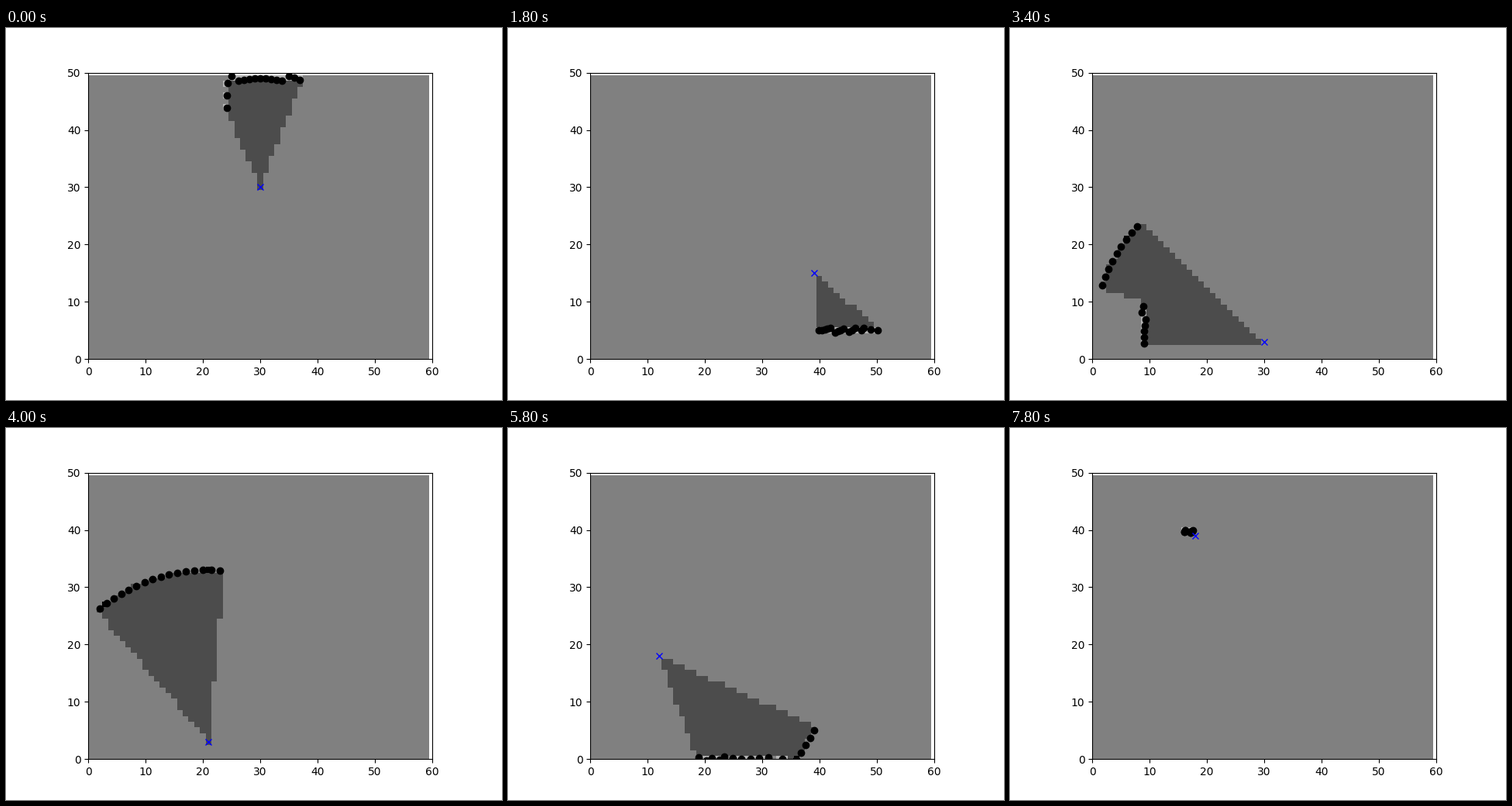
A matplotlib script that plays this animation: 640 px wide and 480 px high, repeating every 8000 ms.

```python
import math

import matplotlib.pyplot as plt
import numpy as np
from matplotlib.animation import FuncAnimation

ROWS, COLS = 50, 60
STEPS = 40
R_MAX = 30
ALPHA, BETA = 1.0, 0.05      # obstacle depth, beam width
TURN = 0.3                   # sensor rotation per step
PHI = np.arange(-0.4, 0.4, 0.05)
MOVES = [(3, 0), (0, 3), (-3, 0), (0, -3)]


def build_world():
    world = np.zeros((ROWS, COLS), dtype=bool)
    world[0:10, 0:10] = True
    world[30:35, 40:45] = True
    world[3:6, 40:60] = True
    world[20:30, 25:29] = True
    world[40:50, 5:25] = True
    return world


WORLD = build_world()


def blocked(row, col):
    return (row <= 0 or row >= ROWS - 1 or col <= 0 or col >= COLS - 1
            or WORLD[row, col])


def drive():
    """Poses of a robot that picks its next direction when it is blocked."""
    row, col, theta, k = 30, 30, 0.0, 1
    poses = [(row, col, theta)]
    for _ in range(STEPS - 1):
        new = row + MOVES[k][0], col + MOVES[k][1]
        if blocked(*new):
            k = (k + 1) % 4
        else:
            row, col = new
        theta = (theta + TURN) % (2 * math.pi)
        poses.append((row, col, theta))
    return poses


def cast(row, col, angle):
    for r in range(1, R_MAX + 1):
        hit_row = int(round(row + r * math.cos(angle)))
        hit_col = int(round(col + r * math.sin(angle)))
        if blocked(hit_row, hit_col):
            return r
    return R_MAX


def inverse_model(row, col, theta, ranges):
    """Occupancy probability of each cell given one scan."""
    i, j = np.mgrid[0:ROWS, 0:COLS]
    r = np.sqrt((i - row) ** 2 + (j - col) ** 2)
    phi = (np.arctan2(j - col, i - row) - theta + np.pi) % (2 * np.pi) - np.pi
    beam = np.abs(phi[..., None] - PHI).argmin(axis=-1)
    reach = ranges[beam]
    unseen = ((r > np.minimum(R_MAX, reach + ALPHA / 2))
              | (np.abs(phi - PHI[beam]) > BETA / 2))
    hit = (reach < R_MAX) & (np.abs(r - reach) < ALPHA / 2)
    return np.select([unseen, hit, r < reach], [0.5, 0.7, 0.3], 0.0)


POSES = drive()

fig, ax = plt.subplots(figsize=(6.4, 4.8), dpi=100)
image = ax.imshow(np.full((ROWS, COLS), 0.5), cmap="gray", origin="lower",
                  vmin=0, vmax=1)
hits, = ax.plot([], [], "ko")
robot, = ax.plot([], [], "bx")
ax.set_xlim(0, COLS)
ax.set_ylim(0, ROWS)


def update(n):
    row, col, theta = POSES[n]
    angles = theta + PHI
    ranges = np.array([cast(row, col, a) for a in angles])
    image.set_data(inverse_model(row, col, theta, ranges))
    hits.set_data(col + ranges * np.sin(angles), row + ranges * np.cos(angles))
    robot.set_data([col], [row])
    return image, hits, robot


anim = FuncAnimation(fig, update, frames=STEPS, interval=200, repeat=True)
plt.show()
```
